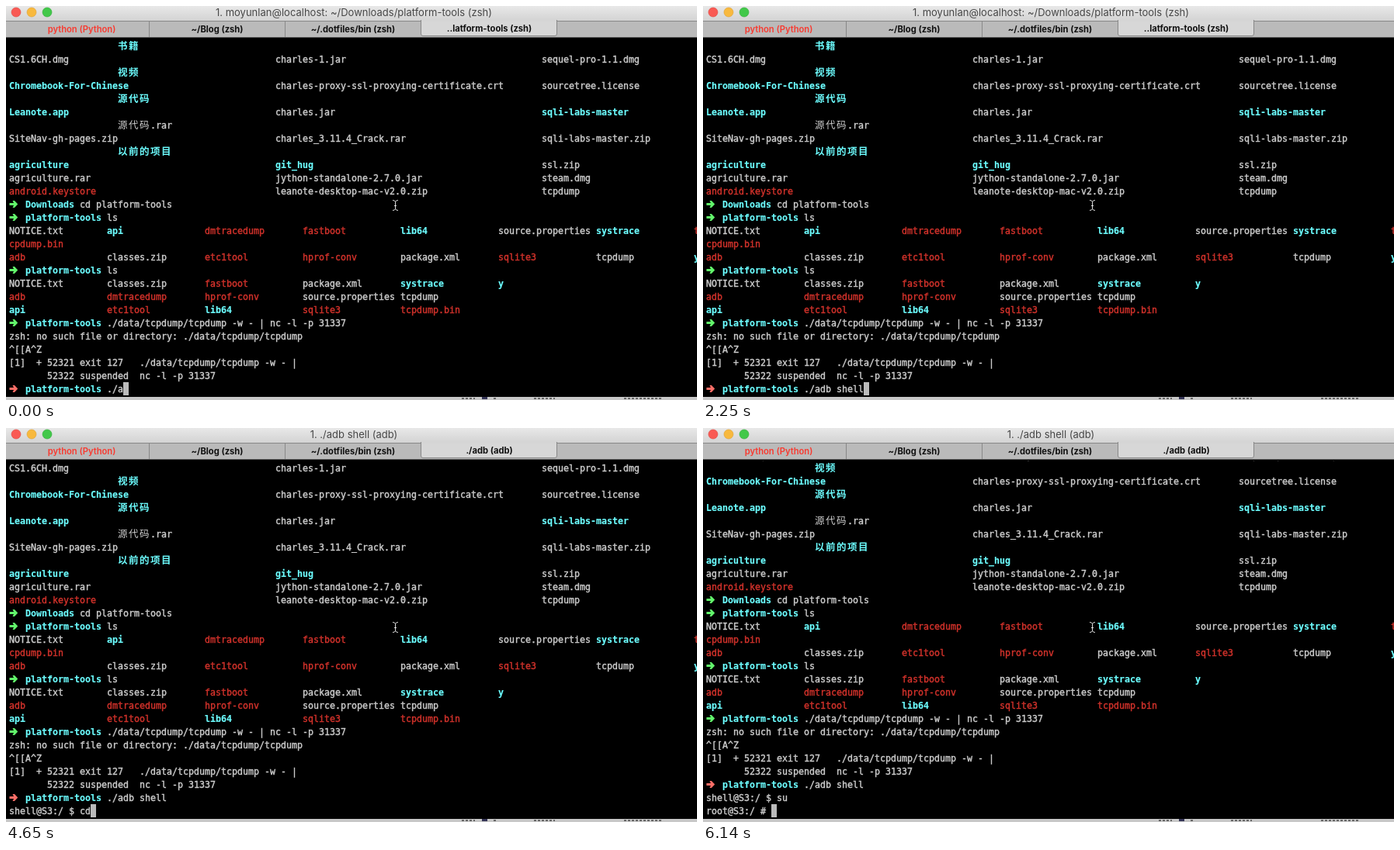
Recreate the animation shown at these times as an HTML page. Size 890x508 px, loop 8000 ms.

```html
<!DOCTYPE html>
<html lang="en">
<head>
<meta charset="utf-8">
<title>Terminal session</title>
<style>
html, body { margin: 0; width: 100%; height: 100%; overflow: hidden; background: #000; }
svg { display: block; width: 890px; height: 508px; }
text { white-space: pre; }
.term text { font: 11.63px "DejaVu Sans Mono", monospace; stroke-width: .4px; }
.term .bold { font-weight: 700; stroke-width: .15px; }
.term .cjk { font-family: "Noto Sans CJK SC", "Noto Sans CJK", "Noto Sans CJK JP", sans-serif; font-size: 12.5px; letter-spacing: 1.5px; stroke-width: 0; }
.title { font: 13px Inter, sans-serif; fill: #474747; text-anchor: middle; }
.tab { font: 700 11.2px Inter, sans-serif; fill: #111; text-anchor: middle; }
</style>
</head>
<body>
<svg viewBox="0 0 890 508">
  <defs>
    <linearGradient id="bar" x2="0" y2="1">
      <stop stop-color="#e8e8e8"/><stop offset="1" stop-color="#d3d3d3"/>
    </linearGradient>
    <clipPath id="screen"><rect y="42" width="890" height="461"/></clipPath>
  </defs>

  <rect width="890" height="508"/>
  <g class="term" clip-path="url(#screen)">
    <g id="lines"><rect id="caret" width="7" height="17" fill="#bbb"/></g>
  </g>

  <rect width="890" height="19" fill="url(#bar)"/>
  <rect y="19" width="890" height="21" fill="#bababa"/>
  <path d="M0 19.5H890M184.5 20V40M359.5 20V40" fill="none" stroke="#888"/>
  <path d="M534.5 18V36Q534.5 38.5 537 38.5H707Q709.5 38.5 709.5 36V18" fill="#d7d7d7" stroke="#888"/>
  <rect x="535" y="17" width="174" height="3" fill="#d5d5d5"/>
  <path d="M0 40.5H890" stroke="#555"/>
  <g stroke-width=".6">
    <circle cx="13" cy="8" r="6" fill="#f95a54" stroke="#dd4641"/>
    <circle cx="33" cy="8" r="6" fill="#f8b93e" stroke="#dc9f34"/>
    <circle cx="53" cy="8" r="6" fill="#42c84a" stroke="#30a938"/>
  </g>
  <text id="title" class="title" x="448" y="13"></text>
  <text class="tab" x="97.500" y="34" style="fill:#f83a30;font-weight:600">python (Python)</text>
  <text class="tab" x="272" y="34">~/Blog (zsh)</text>
  <text class="tab" x="447" y="34">~/.dotfiles/bin (zsh)</text>
  <text id="tab" class="tab" x="622.500" y="33"></text>

  <rect y="504" width="890" height="4" fill="#c8c8c8"/>
  <path d="M587 506H604M628 506H633M680 506H707M796 506H846" stroke="#666" stroke-width="2" stroke-dasharray="3 2"/>
  <path d="M613 505.500H620" stroke="#335" stroke-width="3"/>

  <path d="M498 250.500Q501 250.500 501.500 252.500Q502 250.500 505 250.500M501.500 252V262M498 263.500Q501 263.500 501.500 261.500Q502 263.500 505 263.500M500 257.500H503" fill="none" stroke="#ddd"/>
</svg>
<script>
const LEFT = 4, TOP = 43, CELL = 7, ROW = 17, LOOP = 8000;
const COLORS = { w: '#cdcdcd', c: '#6cfcfe', r: '#d2322b', g: '#62f66b', R: '#ff6e67' };

// Each cell reads: column, style letter, text.
const ls = (...names) => names.map((name, i) => i * 18 + name);
const files = (a, b, c) => ['0' + a, '49' + b, '98' + c];
const prompt = (dir, command, arrow = 'g') => ['0' + arrow, '3c' + dir, dir.length + 4 + 'w' + command];

const rows = [
  ['20c书籍'],
  files('wCS1.6CH.dmg', 'wcharles-1.jar', 'wsequel-pro-1.1.dmg'),
  ['20c视频'],
  files('cChromebook-For-Chinese', 'wcharles-proxy-ssl-proxying-certificate.crt', 'wsourcetree.license'),
  ['20c源代码'],
  files('cLeanote.app', 'wcharles.jar', 'csqli-labs-master'),
  ['20w源代码', '26w.rar'],
  files('wSiteNav-gh-pages.zip', 'wcharles_3.11.4_Crack.rar', 'wsqli-labs-master.zip'),
  ['20c以前的项目'],
  files('cagriculture', 'cgit_hug', 'wssl.zip'),
  files('wagriculture.rar', 'wjython-standalone-2.7.0.jar', 'wsteam.dmg'),
  files('randroid.keystore', 'wleanote-desktop-mac-v2.0.zip', 'wtcpdump'),
  prompt('Downloads', 'cd platform-tools'),
  prompt('platform-tools', 'ls'),
  ls('wNOTICE.txt', 'capi', 'rdmtracedump', 'rfastboot', 'clib64', 'wsource.properties', 'csystrace', 'rt'),
  ['0rcpdump.bin'],
  ls('radb', 'wclasses.zip', 'retc1tool', 'rhprof-conv', 'wpackage.xml', 'rsqlite3', 'wtcpdump', 'cy'),
  prompt('platform-tools', 'ls'),
  ls('wNOTICE.txt', 'wclasses.zip', 'rfastboot', 'wpackage.xml', 'csystrace', 'cy'),
  ls('radb', 'rdmtracedump', 'rhprof-conv', 'wsource.properties', 'wtcpdump'),
  ls('capi', 'retc1tool', 'clib64', 'rsqlite3', 'rtcpdump.bin'),
  prompt('platform-tools', './data/tcpdump/tcpdump -w - | nc -l -p 31337'),
  ['0wzsh: no such file or directory: ./data/tcpdump/tcpdump'],
  ['0w^[[A^Z'],
  ['0w[1]  + 52321 exit 127   ./data/tcpdump/tcpdump -w - |'],
  ['0w       52322 suspended  nc -l -p 31337'],
  prompt('platform-tools', '', 'R'),
  ['0wshell@S3:/ $ '],
  ['0wroot@S3:/ # ']
];

const $ = id => document.getElementById(id);
const lines = $('lines');

function add(tag, attrs, text = '') {
  const el = document.createElementNS('http://www.w3.org/2000/svg', tag);
  for (const key in attrs) el.setAttribute(key, attrs[key]);
  el.textContent = text;
  lines.append(el);
  return el;
}

function addCell(row, col, style, text) {
  const x = LEFT + col * CELL, y = TOP + row * ROW, fill = COLORS[style];
  if (style === 'g' || style === 'R') {
    return add('path', { fill, d: `M${x + .5} ${y + 7}h5.500l-1.500-3h2.500l4.200 4.500l-4.200 4.500h-2.500l1.500-3h-5.500z` });
  }
  const names = [];
  if (style === 'c') names.push('bold');
  if (/[\u4e00-\u9fff]/.test(text)) names.push('cjk');
  return add('text', { x, y: y + 13, fill, stroke: fill, class: names.join(' ') }, text);
}

rows.forEach((cells, row) => cells.forEach(cell => {
  const [, col, style, text] = cell.match(/^(\d+)(\w)(.*)$/);
  addCell(row, +col, style, text);
}));

const command = addCell(26, 18, 'w', '');
const input = addCell(27, 13, 'w', '');

const keyTimes = [150, 600, 900, 1200, 1350, 1650, 2100, 2250];
const inputSteps = [[0, ''], [4650, 'cd'], [4950, 'cd '], [5240, 'cd'], [5390, 'c'], [5540, ''], [5690, 's'], [5840, 'su']];

function render(t) {
  const scroll = t < 2700 ? 0 : t < 6140 ? 1 : 2;
  const typed = './adb shell'.slice(0, 3 + keyTimes.filter(k => k <= t).length);
  const entry = inputSteps.filter(step => step[0] <= t).pop()[1];
  command.textContent = typed;
  input.textContent = entry;

  const col = [18 + typed.length, 13 + entry.length, 12][scroll];
  $('caret').setAttribute('x', LEFT + col * CELL);
  $('caret').setAttribute('y', TOP + (26 + scroll) * ROW);
  lines.setAttribute('transform', `translate(0 ${-scroll * ROW})`);

  $('title').textContent = scroll
    ? `1. ./adb shell (${t < 3900 ? 'zsh' : 'adb'})`
    : '1. moyunlan@localhost: ~/Downloads/platform-tools (zsh)';
  $('tab').textContent = scroll ? `./adb (${t < 3750 ? 'zsh' : 'adb'})` : '..latform-tools (zsh)';
}

const start = performance.now();
function tick() {
  render((performance.now() - start) % LOOP);
  requestAnimationFrame(tick);
}
render(0);
requestAnimationFrame(tick);
</script>
</body>
</html>
```
